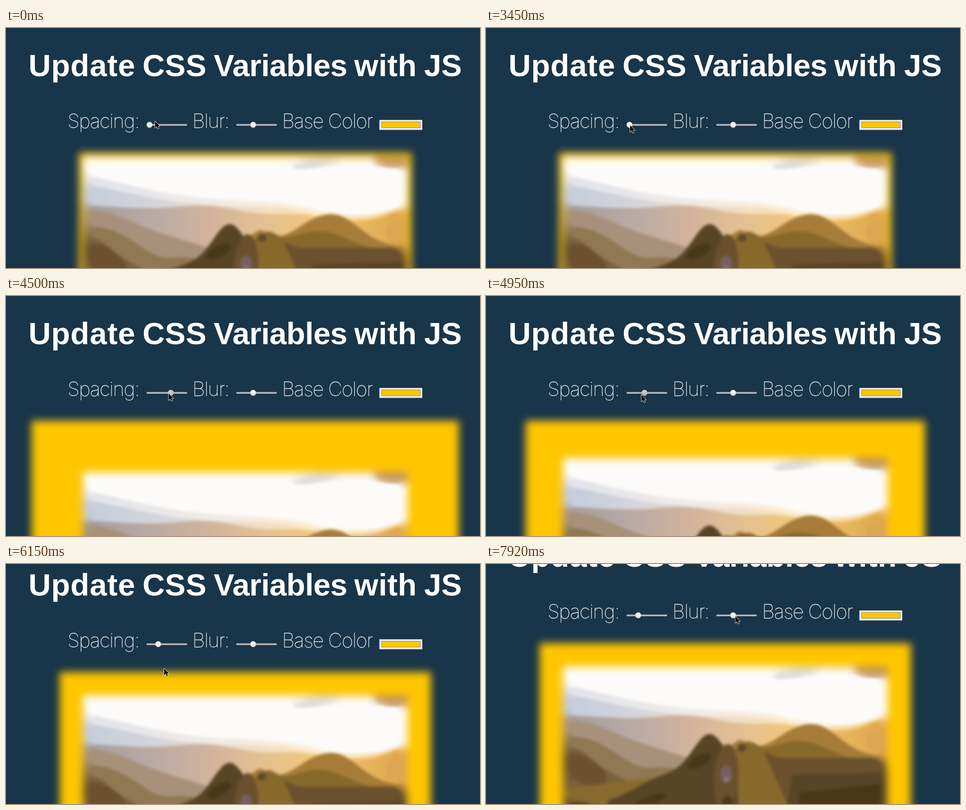
An HTML page that plays this animation: 1052 by 533 pixels, repeating every 8000 ms.

```html
<!DOCTYPE html>
<html lang="en">
<head>
<meta charset="utf-8">
<title>Update CSS Variables with JS</title>
<style>
  html, body { margin: 0; width: 100%; height: 100%; overflow: hidden; background: #193549; }
  svg { display: block; width: 1052px; height: 533px; }
  filter { color-interpolation-filters: sRGB; }
  .title { font: bold 68.5px "Liberation Sans", Arial, sans-serif; fill: #fff; }
  .label { font: 100 44px Inter, Roboto, sans-serif; letter-spacing: -1.65px; fill: #fff; stroke: #fff; stroke-width: .3; }
  .track { fill: url(#rail); }
  .thumb { fill: url(#knob); stroke: #8f9299; stroke-width: .5; }
  .thumb.active { fill: url(#knobDown); }
</style>
</head>
<body>
<svg viewBox="0 0 1052 533">
  <defs>
    <filter id="blur9" filterUnits="userSpaceOnUse" x="-40" y="230" width="1140" height="580"><feGaussianBlur stdDeviation="9"/></filter>
    <filter id="blur3" filterUnits="userSpaceOnUse" x="150" y="200" width="770" height="460"><feGaussianBlur stdDeviation="3"/></filter>
    <filter id="fade" filterUnits="userSpaceOnUse" x="150" y="200" width="770" height="540"><feGaussianBlur stdDeviation="6"/></filter>
    <clipPath id="crop"><rect x="171" y="228" width="720" height="480"/></clipPath>
    <mask id="inset" maskUnits="userSpaceOnUse" x="150" y="200" width="770" height="540"><rect x="190" y="250" width="684" height="480" fill="#fff" filter="url(#fade)"/></mask>
    <linearGradient id="rail" x2="0" y2="1"><stop stop-color="#928f96"/><stop offset=".5" stop-color="#b9b3b7"/><stop offset="1" stop-color="#c5c0c2"/></linearGradient>
    <linearGradient id="knob" x2="0" y2="1"><stop stop-color="#fff"/><stop offset=".5" stop-color="#efefef"/><stop offset="1" stop-color="#dcdcdc"/></linearGradient>
    <linearGradient id="knobDown" x2="0" y2="1"><stop stop-color="#d5d5da"/><stop offset="1" stop-color="#b5b5bc"/></linearGradient>
    <linearGradient id="sky" gradientUnits="userSpaceOnUse" x1="171" x2="891">
      <stop stop-color="#c4ccdb"/><stop offset=".22" stop-color="#d5d5da"/><stop offset=".48" stop-color="#ecdcca"/><stop offset=".73" stop-color="#fbe3b0"/><stop offset="1" stop-color="#efb95c"/>
    </linearGradient>
    <linearGradient id="haze" gradientUnits="userSpaceOnUse" x1="171" x2="891">
      <stop stop-color="#a59c9a"/><stop offset=".18" stop-color="#b5a8a4"/><stop offset=".37" stop-color="#cfb29e"/><stop offset=".55" stop-color="#e4c092"/><stop offset=".74" stop-color="#f3c777"/><stop offset=".96" stop-color="#e0a94f"/>
    </linearGradient>
    <g id="scene"><rect x="171" y="228" width="720" height="480" fill="#fcfbf9"/></g>
  </defs>

  <g id="page">
    <g class="title">
      <text x="50" y="107" letter-spacing=".9">Update</text>
      <text x="303" y="107" letter-spacing=".4">CSS</text>
      <text x="461" y="107" letter-spacing="-.5">Variables</text>
      <text x="773" y="107" letter-spacing=".5">with</text>
      <text x="928" y="107">JS</text>
    </g>
    <g class="label">
      <text x="136.5" y="222">Spacing:</text>
      <text x="413.5" y="222">Blur:</text>
      <text x="612.5" y="222">Base Color</text>
    </g>
    <rect class="track" x="312" y="213" width="90" height="4" rx="1.5"/>
    <circle class="thumb" id="spacing" cy="215" r="6.5"/>
    <rect class="track" x="511" y="213" width="90" height="4" rx="1.5"/>
    <circle class="thumb" cx="548.5" cy="215" r="6.5"/>
    <rect x="829" y="204.5" width="94.5" height="21.5" fill="#efeeec" stroke="#c9c9c9"/>
    <rect x="833.5" y="208.5" width="86" height="13" fill="#ffc600" stroke="#85857c"/>

    <g filter="url(#blur9)">
      <rect id="frame" y="277" height="900" fill="#ffc600"/>
      <g class="photo"><use href="#scene" clip-path="url(#crop)"/></g>
    </g>
    <g class="photo"><g mask="url(#inset)"><use href="#scene" filter="url(#blur3)"/></g></g>
  </g>

  <path id="arrow" d="M0 0V15L3.5 11.8 5.9 17 8.2 16 5.9 11H10.4Z" stroke="#fff" stroke-width="1.6" paint-order="stroke" stroke-linejoin="round"/>
  <g id="beam" transform="translate(429 78)" fill="none">
    <path id="bar" d="M-3 -7Q0 -7 0 -5V5Q0 7 -3 7M3 -7Q0 -7 0 -5V5Q0 7 3 7" stroke="#fff" stroke-width="2.5"/>
    <path d="M-3 -7Q0 -7 0 -5V5Q0 7 -3 7M3 -7Q0 -7 0 -5V5Q0 7 3 7" stroke="#111"/>
  </g>
</svg>
<script>
const LOOP = 8000;
const $ = id => document.getElementById(id);
const photos = document.querySelectorAll('.photo');

function add(tag, attrs) {
  const el = document.createElementNS('http://www.w3.org/2000/svg', tag);
  for (const k in attrs) el.setAttribute(k, attrs[k]);
  $('scene').append(el);
}

// A sloping skyline from y0 to y1, raised by bell-shaped humps [centre, width, height]
function ridge(fill, y0, y1, humps = [], { from = 171, to = 891, lean = 0, opacity = 1 } = {}) {
  let d = '';
  for (let x = from; x <= to; x += 6) {
    const slope = y0 + (y1 - y0) * (x - from) / (to - from);
    const y = humps.reduce((s, [c, w, h]) => s - h * Math.exp(-(((x - c) / w) ** 2)), slope);
    d += `${d ? 'L' : 'M'}${x} ${y.toFixed(1)}`;
  }
  add('path', { d: `${d}L${to} 708L${from + lean} 708Z`, fill, 'fill-opacity': opacity });
}

function blob(fill, cx, cy, rx, ry, tilt = 0) {
  add('ellipse', { fill, cx, cy, rx, ry, transform: `rotate(${tilt} ${cx} ${cy})` });
}

function paint() {
  const sky = [[400, 200, -22], [740, 90, -14], [891, 50, 22]];
  blob('#d9d6d8', 690, 241, 54, 10, -10);
  blob('#f3e6d2', 780, 226, 90, 9);
  blob('#c2935a', 868, 235, 52, 17);

  ridge('url(#sky)', 262, 360, sky, { opacity: .5 });
  ridge('url(#sky)', 282, 366, sky);
  ridge('url(#haze)', 335, 378, [[450, 90, 15], [650, 70, 8], [891, 60, 30]]);
  blob('#dca654', 868, 395, 26, 22);

  // Hazy slopes on the left
  ridge('#a8917a', 345, 565, [[240, 60, 10]]);
  ridge('#8f7852', 380, 590, [[230, 40, 8], [340, 50, -20]]);
  ridge('#78603a', 405, 800, [[210, 30, 12]]);
  blob('#6b512e', 218, 458, 54, 28, 30);
  ridge('#876a2d', 498, 466, [], { to: 460 });
  ridge('#5f4a27', 526, 545, [[215, 25, 6]], { to: 280 });

  // Lit ridge on the right
  ridge('#a67c38', 405, 428, [[565, 18, 17], [670, 50, 18], [735, 70, 58]], { from: 520 });
  ridge('#88692c', 420, 443, [[580, 28, 24], [700, 85, 38]], { from: 530 });
  ridge('#6b512d', 430, 430, [[617, 20, 12], [891, 20, -14]], { from: 617, lean: 130 });
  ridge('#574526', 468, 462, [], { from: 680, lean: -40 });
  ridge('#483819', 507, 488, [], { from: 695, to: 877 });
  blob('#5f4a27', 568, 408, 10, 9);

  // Dark peak in the middle
  ridge('#574526', 530, 470, [[497, 52, 95], [400, 90, 35]], { from: 270, to: 562 });
  blob('#6a502d', 533, 475, 27, 75, 3);
  blob('#483819', 473, 438, 30, 13, -28);
  blob('#483819', 360, 528, 42, 11, -22);
  blob('#483819', 536, 530, 12, 15);
  blob('#775f61', 533, 467, 13, 20);
  blob('#a0846c', 533, 478, 5, 5);
}

const clamp = k => Math.min(1, Math.max(0, k));
const part = (t, a, b) => clamp((t - a) / (b - a));
const smooth = k => k * k * (3 - 2 * k);
const mix = (a, b, k) => a + (b - a) * k;

const gapAt = t => mix(9, 128, smooth(part(t, 3450, 4150))) - 76 * part(t, 4300, 5400);
const scrollAt = t => 101 * (1 - (1 - part(t, 6000, 7030)) ** 3);
const thumbAt = gap => 318.5 + (gap - 9) / 2.23;

function bezier(pts, k) {
  while (pts.length > 1) {
    pts = pts.slice(1).map(([x, y], i) => [mix(pts[i][0], x, k), mix(pts[i][1], y, k)]);
  }
  return pts[0];
}

// Pointer strokes: start, end, control points
const strokes = [
  [0, 900, [[331, 207], [280, 185], [429, 78]]],
  [2400, 3450, [[536, 34], [180, 20], [170, 260], [320, 216]]],
  [4300, 5700, [[373, 216], [326, 216], [351, 232]]],
  [6440, 7030, [[351, 232], [526, 117]]],
  [7030, 7920, [[526, 117], [554, 116]]]
];

function pointerAt(t) {
  if (t > 3450 && t < 4300) return [thumbAt(gapAt(t)) + 2, 216];
  const [a, b, pts] = strokes.findLast(s => s[0] <= t);
  return bezier(pts, part(t, a, b));
}

const tick = t => t < 6000 ? Math.floor(t / 150) * 150 : 6000 + Math.floor((t - 6000) / 146.6) * 146.6;

function draw(t) {
  const gap = gapAt(t);
  $('page').setAttribute('transform', `translate(0 ${-Math.round(scrollAt(t))})`);
  $('frame').setAttribute('x', 171 - gap);
  $('frame').setAttribute('width', 720 + 2 * gap);
  photos.forEach(p => p.setAttribute('transform', `translate(0 ${49 + gap})`));
  $('spacing').setAttribute('cx', thumbAt(gap));
  $('spacing').classList.toggle('active', t >= 3600 && t < 5550);
  $('arrow').setAttribute('transform', `translate(${pointerAt(t)})`);
  $('arrow').style.display = t >= 900 && t < 2400 ? 'none' : '';
  $('beam').style.display = t >= 900 && t < 1200 ? '' : 'none';
}

let start, last;
function loop(now) {
  start ??= now;
  const t = tick((now - start) % LOOP);
  if (t !== last) draw(last = t);
  requestAnimationFrame(loop);
}
paint();
draw(0);
requestAnimationFrame(loop);
</script>
</body>
</html>
```
